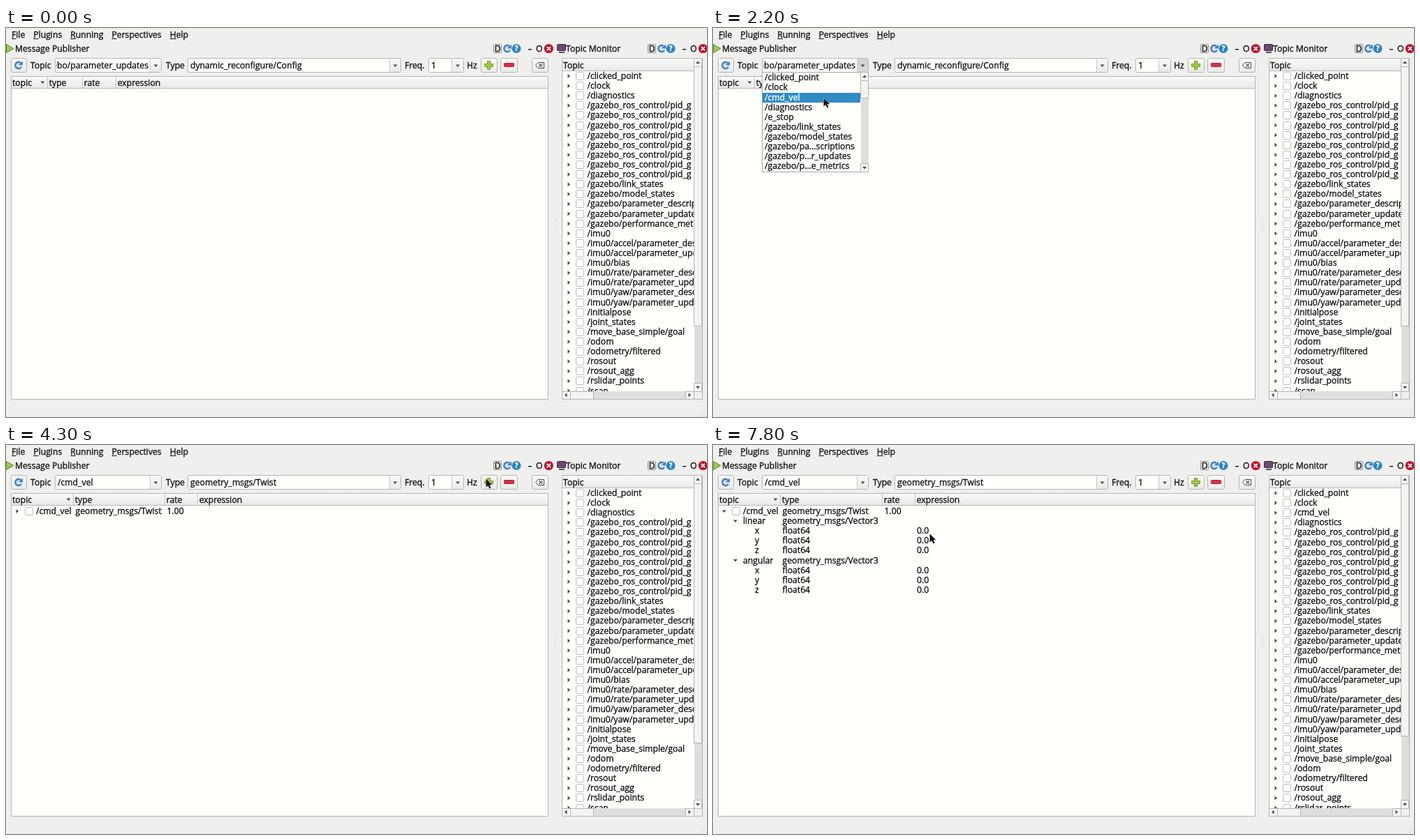
Write an HTML page with a canvas that moves like this. It is 1004x558 px and loops after 8 s.

```html
<!DOCTYPE html>
<html lang="en">
<head>
<meta charset="utf-8">
<title>Message Publisher</title>
<style>
html, body { margin: 0; width: 100%; height: 100%; overflow: hidden; background: #efefed; }
canvas { display: block; }
</style>
</head>
<body>
<canvas id="stage" width="1004" height="558"></canvas>
<script>
const LOOP = 8000, STEP = 100;
const BG = '#efefed', PAPER = '#fffffc', LINE = '#b5b5b3', INK = '#141414', GROOVE = '#dededc';
const ROW = 14.11, POPUP_TOP = 64.3;
const c = document.getElementById('stage').getContext('2d');

const treeRow = n => 95 + n * ROW;
const choiceRow = n => POPUP_TOP + (n + .5) * ROW;

// Pointer moves: start, end, x and y reached; it rests in between.
const MOVES = [
  [400, 400, 264, 73],
  [400, 500, 264, 63],
  [600, 900, 210, 50],
  [1200, 1400, 180, choiceRow(3)],
  [1500, 2200, 158, choiceRow(2)],
  [2500, 2800, 462, 175],
  [2800, 3100, 604, 40],
  [3100, 3500, 525, 91],
  [3500, 4000, 687, 48],
  [4300, 5100, 12, treeRow(0) - 4],
  [5400, 5600, 28, treeRow(1)],
  [6100, 6200, 43, 176],
  [6200, 6500, 31, treeRow(5) - 3],
  [6800, 6900, 243, 299],
  [7200, 7300, 328, 139],
  [7500, 7800, 310, treeRow(2) + 4]
];

const params = p => [p + '/parameter_descriptions', p + '/parameter_updates'];
const TOPICS = [
  '/clicked_point', '/clock', '/diagnostics',
  ...Array(8).fill('/gazebo_ros_control/pid_g'),
  '/gazebo/link_states', '/gazebo/model_states', ...params('/gazebo'), '/gazebo/performance_metrics',
  '/imu0', ...params('/imu0/accel'), '/imu0/bias', ...params('/imu0/rate'), ...params('/imu0/yaw'),
  '/initialpose', '/joint_states', '/move_base_simple/goal', '/odom', '/odometry/filtered',
  '/rosout', '/rosout_agg', '/rslidar_points', '/scan'
];
const TOPICS_AFTER = [...TOPICS.slice(0, 2), '/cmd_vel', ...TOPICS.slice(2)];
const CHOICES = [
  '/clicked_point', '/clock', '/cmd_vel', '/diagnostics', '/e_stop', '/gazebo/link_states',
  '/gazebo/model_states', '/gazebo/pa…scriptions', '/gazebo/p…r_updates', '/gazebo/p…e_metrics'
];

function setFont(font = '12.2px') { c.font = font + ' "Open Sans", "Noto Sans", sans-serif'; }

// A hairline outline gives the text its slightly heavy weight.
function text(s, x, mid, color = INK) {
  const y = Math.round(mid + 4);
  c.fillStyle = c.strokeStyle = color;
  c.lineWidth = .35;
  c.fillText(s, x, y);
  c.strokeText(s, x, y);
}

function fill(x, y, w, h, color) {
  c.fillStyle = color;
  c.fillRect(x, y, w, h);
}

function box(x, y, w, h, color = PAPER, edge = LINE, r = 0) {
  c.beginPath();
  c.roundRect(x + .5, y + .5, w - 1, h - 1, r);
  c.fillStyle = color;
  c.fill();
  c.strokeStyle = edge;
  c.lineWidth = 1;
  c.stroke();
}

function shade(y, h) {
  const g = c.createLinearGradient(0, y, 0, y + h);
  g.addColorStop(0, '#f9f9f8');
  g.addColorStop(1, '#e9e9e7');
  return g;
}

function poly(points, color, edge) {
  c.beginPath();
  points.forEach(([x, y]) => c.lineTo(x, y));
  c.closePath();
  c.fillStyle = color;
  c.fill();
  if (edge) { c.strokeStyle = edge; c.lineWidth = 1; c.stroke(); }
}

function cross(x, y, r, color, width) {
  c.beginPath();
  for (const s of [-1, 1]) { c.moveTo(x - r, y - s * r); c.lineTo(x + r, y + s * r); }
  c.strokeStyle = color;
  c.lineWidth = width;
  c.stroke();
}

function disc(x, y, r, color) {
  c.beginPath();
  c.arc(x, y, r, 0, 7);
  c.fillStyle = color;
  c.fill();
}

// Small triangle; turn 0 points right, 1 down, 2 left, 3 up.
function arrow(x, y, turn) {
  c.save();
  c.translate(x, y);
  c.rotate(turn * Math.PI / 2);
  poly([[-1.5, -3], [2, 0], [-1.5, 3]], '#4a4a4a');
  c.restore();
}

function clipped(x, y, w, h, draw) {
  c.save();
  c.beginPath();
  c.rect(x, y, w, h);
  c.clip();
  draw();
  c.restore();
}

function button(x, w) { box(x, 43, w, 21, shade(43, 21), LINE, 2); }

function refresh(x, y) {
  disc(x, y, 6.3, '#d5e4f2');
  c.beginPath();
  c.arc(x, y, 4.6, .6, 5.4);
  c.strokeStyle = '#3f7fbd';
  c.lineWidth = 2.4;
  c.stroke();
  poly([[x + 6, y - 6], [x + 6, y], [x, y - .5]], '#3f7fbd');
}

function combo(x, w, split, pressed) {
  box(x, 43, w, 21, PAPER, LINE, 2);
  fill(split, 44, x + w - split - 1, 19, pressed ? '#d4d4d2' : shade(44, 19));
  fill(split, 44, 1, 19, '#c9c9c7');
  arrow((split + x + w) / 2, 54, 1);
}

function scrollbar(x, y, h, thumbEnd) {
  fill(x + 1, y, 11, h, GROOVE);
  box(x, y, 12, 13, '#f5f5f4');
  box(x, y + 12, 12, thumbEnd - y - 12, '#f3f3f2');
  box(x, y + h - 13, 12, 13, '#f5f5f4');
  arrow(x + 6, y + 6.5, 3);
  arrow(x + 6, y + h - 6.5, 1);
}

function dockButtons(x) {
  box(x, 23, 12, 13, '#e4e4e2', '#8d8d8b', 1);
  text('D', x + 1.7, 30);
  refresh(x + 20, 29.5);
  disc(x + 33, 29.5, 6.5, '#2b86c5');
  setFont('bold 10px');
  text('?', x + 30.7, 29, '#fff');
  setFont();
  fill(x + 50, 30, 5, 1.4, INK);
  text('O', x + 61, 30);
  disc(x + 79.3, 29.5, 6.6, '#c50f2c');
  cross(x + 79.3, 29.5, 2.6, '#fff', 1.8);
}

function chrome() {
  fill(0, 0, 1004, 558, BG);
  let x = 8;
  for (const label of ['File', 'Plugins', 'Running', 'Perspectives', 'Help']) {
    text(label, x, 9.5);
    fill(x, 15, c.measureText(label[0]).width, 1, INK);
    x += c.measureText(label).width + 12;
  }
  poly([[.5, 23.5], [11, 29.5], [.5, 35.5]], '#9ccb4c', '#5d8a24');
  text('Message Publisher', 13, 30);
  dockButtons(698);
  box(789, 23, 13, 10, '#6b4a78', '#33263a', 1);
  fill(792, 34, 8, 2, '#55505a');
  text('Topic Monitor', 802, 30);
  dockButtons(919);
  for (let y = 275; y < 288; y += 3) fill(786.5, y, 1, 1, '#bcbcba');
  for (let i = 0; i < 4; i++)
    for (let j = 0; j <= i; j++) fill(1001 - j * 3, 547 + i * 3, 1, 1, '#c6c6c4');
}

function toolbar(t) {
  const chosen = t >= 2400, open = t >= 1100 && !chosen;
  button(7, 23);
  refresh(18, 53.5);
  text('Topic', 35, 54);
  combo(70, 153, 206, open);
  clipped(72, 44, 133, 19, () => {
    const s = '/gazebo/parameter_updates';
    text(chosen ? '/cmd_vel' : s, chosen ? 74 : 204 - c.measureText(s).width, 54);
  });
  text('Type', 229, 54);
  combo(260, 306, 549);
  text(chosen ? 'geometry_msgs/Twist' : 'dynamic_reconfigure/Config', 264, 54);
  text('Freq.', 571, 54);
  combo(605, 51, 638);
  text('1', 609, 54);
  text('Hz', 660, 54);
  button(680, 24);
  box(685, 51, 13, 5, '#a3ca3d', '#769c22');
  box(689, 47, 5, 13, '#a3ca3d', '#769c22');
  fill(686, 52, 11, 3, '#a3ca3d');
  button(708, 25);
  box(713, 50, 15, 6, '#d9304a', '#b01d35', 1);
  button(753, 24);
  poly([[758.5, 53.5], [762, 49.5], [770.5, 49.5], [770.5, 57.5], [762, 57.5]], '#f8f8f7', '#4a4a4a');
  cross(765.8, 53.5, 2.3, '#4a4a4a', 1.2);
}

function check(x, mid) { box(x, Math.round(mid) - 6, 12, 12, PAPER, '#bcbcba', 1); }

function header(x, y, w, h) {
  fill(x, y, w, h, shade(y, h));
  fill(x, y + h, w, 1, LINE);
}

function table(t) {
  const added = t >= 4300, wide = t >= 5300;
  const widths = added ? [89, wide ? 146 : 131, 47] : [52, 50, 48];
  let x = 7;
  const edges = widths.map(w => x += w);
  box(7, 69, 770, 464);
  header(8, 70, 768, 16);
  text('topic', 9, 79);
  arrow(edges[0] - 6.5, 78, 1);
  ['type', 'rate', 'expression'].forEach((s, i) => {
    fill(edges[i], 70, 1, 16, '#c4c4c2');
    text(s, edges[i] + 2.7, 79);
  });
  if (!added) return;

  let row = 0;
  const line = (label, x, type) => {
    text(label, x, treeRow(row));
    text(type, 99.5, treeRow(row));
  };
  check(27, treeRow(0));
  arrow(16, treeRow(0), wide ? 1 : 0);
  line('/cmd_vel', 43, 'geometry_msgs/Twist');
  text('1.00', edges[1] + 3.5, treeRow(0));
  if (!wide) return;
  for (const [name, when] of [['linear', 5800], ['angular', 6700]]) {
    row++;
    arrow(32, treeRow(row), t < when ? 0 : 1);
    line(name, 43, 'geometry_msgs/Vector3');
    if (t < when) continue;
    for (const axis of 'xyz') {
      row++;
      line(axis, 60, 'float64');
      text('0.0', 292, treeRow(row));
    }
  }
}

function monitor(t) {
  const grown = t >= 4600;
  box(796, 43, 202, 490);
  header(797, 44, 188, 17);
  text('Topic', 798, 53.5);
  clipped(797, 62, 188, 459, () => {
    (grown ? TOPICS_AFTER : TOPICS).forEach((name, i) => {
      const mid = 69 + i * ROW;
      arrow(806, mid, 0);
      check(816, mid);
      text(name, 832.5, mid);
    });
  });
  scrollbar(985, 43, 479, grown ? 418 : 428);
  fill(997, 43, 1, 490, LINE);
  fill(797, 521, 188, 11, GROOVE);
  box(796, 521, 13, 12, '#f5f5f4');
  box(808, 521, 34, 12, '#f3f3f2');
  box(973, 521, 13, 12, '#f5f5f4');
  arrow(802, 526.5, 2);
  arrow(979, 526.5, 0);
  fill(986, 522, 11, 10, BG);
}

function popup(t, pointer) {
  const hover = t < 1300 ? 8 : Math.floor((pointer[1] - POPUP_TOP) / ROW);
  box(70, 63, 153, 144, PAPER, '#a5a5a3');
  clipped(71, 64, 140, 142, () => CHOICES.forEach((name, i) => {
    if (i === hover) fill(71, Math.round(POPUP_TOP + i * ROW), 140, 14, '#308cc6');
    text(name, 74, choiceRow(i), i === hover ? '#fff' : INK);
  }));
  scrollbar(211, 63, 144, 101);
}

function pointerAt(t) {
  let from = null;
  for (const [start, end, x, y] of MOVES) {
    if (t < start) break;
    const f = t >= end ? 1 : (t - start) / (end - start);
    from = from ? [from[0] + (x - from[0]) * f, from[1] + (y - from[1]) * f] : [x, y];
  }
  return from;
}

function drawPointer([x, y]) {
  const shape = [[0, 0], [0, 12], [2.8, 9.5], [5, 14], [7, 13], [5, 8.7], [8.6, 8.5]];
  c.save();
  c.translate(Math.round(x) + .5, Math.round(y) + .5);
  poly(shape, '#151515', '#f4f4f4');
  poly(shape, '#151515');
  c.restore();
}

const start = performance.now();

function frame(now) {
  const t = Math.floor(Math.max(0, now - start) % LOOP / STEP) * STEP;
  const pointer = pointerAt(t);
  setFont();
  chrome();
  toolbar(t);
  table(t);
  monitor(t);
  if (t >= 1100 && t < 2400) popup(t, pointer);
  if (pointer) drawPointer(pointer);
  requestAnimationFrame(frame);
}

requestAnimationFrame(frame);
</script>
</body>
</html>
```
